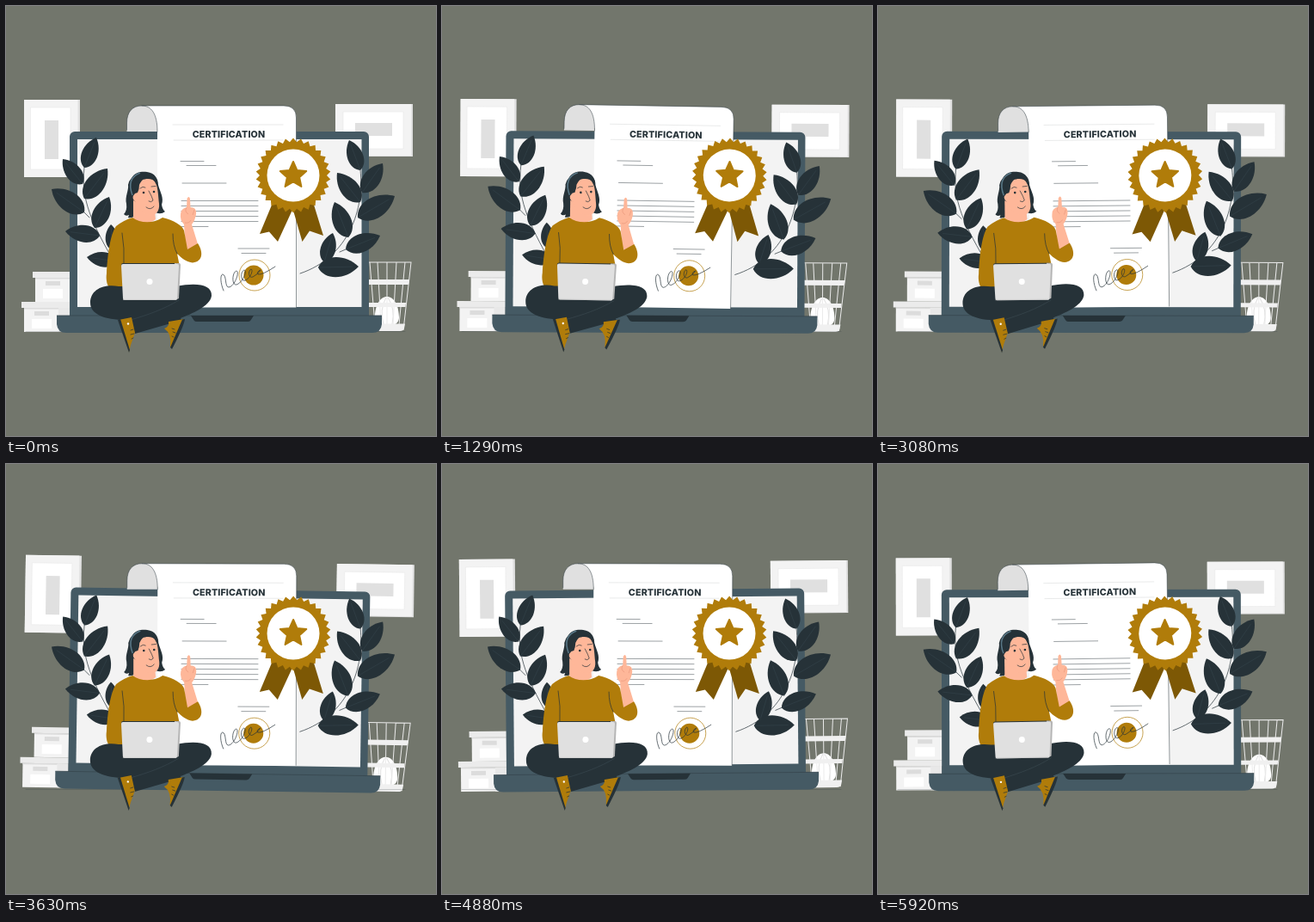
Recreate the animation shown at these times as an HTML page. Size 500 by 500 pixels, loop 5960 ms.

```html
<!DOCTYPE html>
<html lang="en">
<head>
<meta charset="utf-8">
<title>Certification</title>
<style>
  html, body { margin: 0; width: 100%; height: 100%; overflow: hidden; background: #72766c; }
  svg { display: block; width: 100vw; height: 100vh; }
  .ink { fill: none; stroke: #263238; stroke-width: .7; stroke-linecap: round; stroke-linejoin: round; }
  .dark { fill: #263238; }
  .steel { fill: #455a64; }
  .gold { fill: #b07c0a; }
  .skin { fill: #feb799; }
  text { font: 800 10.7px Inter, "Open Sans", sans-serif; letter-spacing: .15px; fill: #263238; }
</style>
</head>
<body>
<svg viewBox="0 0 500 500">
  <!-- wall frames, boxes, basket -->
  <g class="back">
    <path fill="#e0e0e0" d="M21 109H86V199H21z"/>
    <path fill="#f3f3f3" d="M21 109H83.500V199H21z"/>
    <path fill="#fff" stroke="#e8e8e8" stroke-width=".6" d="M28.500 118H75V190H28.500z"/>
    <path fill="#e0e0e0" d="M45 133H61V178H45z"/>

    <path fill="#e0e0e0" d="M383 114H473V175H383z"/>
    <path fill="#f3f3f3" d="M383 114H471V174H383z"/>
    <path fill="#fff" stroke="#e8e8e8" stroke-width=".6" d="M392 123H462V166H392z"/>
    <path fill="#e0e0e0" d="M406 136H449V151H406z"/>

    <g id="box">
      <path fill="#f3f3f3" d="M21 351H74V379H21z"/>
      <path fill="#e8e8e8" d="M61 351H74V379H61z"/>
      <path fill="#ebebeb" d="M18 344H76V351H18z"/>
      <path fill="#dcdcdc" d="M21 351H61V352.500H21zM33 355H50V360H33z"/>
      <path fill="#fff" d="M30 364H53V375H30z"/>
    </g>
    <use href="#box" x="13" y="-35"/>

    <path fill="#fff" d="M429 362C429 348 435 338 443 338S457 348 457 362Q457 372 443 372T429 362z"/>
    <path fill="none" stroke="#e0e0e0" d="M439 370Q434 353 442 339M449 370Q453 352 444 339"/>
    <path fill="none" stroke="#ebebeb" d="M421 298H471L462 377M464 298L457 371M454 298L450 371M443 298V371M432 298L436 371M423 298L429 371"/>
    <path fill="#f0f0f0" d="M421 318H469L468 324H421zM421 345H465L464.500 350H421zM421 369.500H464L463 375Q462 378 458 378H421z"/>
  </g>

  <path class="ink" opacity=".3" d="M23 378.500H464"/>

  <!-- large laptop -->
  <g class="back">
    <rect class="steel" x="74" y="146" width="348" height="222" rx="6"/>
    <path fill="#f3f3f3" d="M83 155H413.500V350H83z"/>
    <path class="steel" d="M59 360H437V370Q436 380 426 380H70Q60 380 59 370z"/>
    <path fill="none" stroke="#37474f" stroke-width=".8" d="M59 360H437"/>
    <path class="dark" d="M215 360H288L284.500 365.500Q283.500 367 281 367H222Q219.500 367 218.500 365.500z"/>
  </g>

  <g id="plants"></g>

  <!-- certificate -->
  <g id="paper">
    <path fill="#fff" d="M158 116H323Q337.500 116 337.500 130V350.500H176V143z"/>
    <path fill="#e0e0e0" d="M140.500 146V136C140.500 123 147 116 158 116S176 125 176 146z"/>
    <path class="ink" stroke-width=".5" opacity=".7" d="M140.500 144V136C140.500 123 147 116 158 116S176 125 176 146M158 116H323Q337.500 116 337.500 130V350"/>
    <path class="ink" opacity=".15" d="M194 138H322M195 156H322"/>
    <text x="259" y="153" text-anchor="middle">CERTIFICATION</text>
    <path class="ink" opacity=".65" d="M203 180.500H230M210 185.500H244M205 206H256M204 226.500H293M204 232.500H293M204 238.500H293M204 244.500H293M204 250.500H293M204 256.500H235M270 282H306M274 287.500H302"/>
    <circle cx="289" cy="313" r="18" fill="none" stroke="#b07c0a" stroke-width=".7"/>
    <circle class="gold" cx="288" cy="313" r="11.500"/>
    <path class="ink" stroke-width=".6" d="M253 331C249 322 249 312 252 312C257 313 254 327 259 327C266 326 272 309 268 308C263 309 262 325 268 324C275 322 281 308 277 307C272 309 273 321 278 319C284 317 288 307 285 306C281 308 282 317 287 315Q293 312 296 307Q291 309 293 312Q298 313 313 303"/>
  </g>

  <g id="medal">
    <path fill="#7d5805" d="M310 229L295 265L306 262.500L316 274L333.500 236L344.500 274L353 261.500L369 267L357 228z"/>
    <path id="rosette" class="gold"/>
    <circle cx="334" cy="197" r="30.500" fill="#fff"/>
    <path id="star" class="gold" stroke="#b07c0a" stroke-width="2" stroke-linejoin="round"/>
  </g>

  <!-- person -->
  <g id="person">
    <path class="dark" d="M146 200C150 193 158 192 164 193C173 194 177 201 177 208C179 216 184 223 181 231Q182 237 185 239Q180 243 174 240L150 244Q146 247 142 246L143 243Q139 245 137 242Q141 238 140 230C138 222 143 214 142 208Q143 203 146 200z"/>
    <path class="skin" d="M148 226V249Q161 258 174 248L173 238z"/>
    <path class="skin" d="M153 207C157 200 170 199 174 205C177 213 177 221 178 230C179 239 173 245 166 243C158 241 153 236 151 228Q146 225 148 218Q150 214 153 217z"/>
    <path class="dark" d="M147 222C145 205 151 197 163 198Q157 203 155 208Q155 213 153 217L150 218zM161 198Q171 198 175.500 209Q178 202 171 197z"/>
    <path fill="none" stroke="#587685" stroke-width="1.600" d="M147 220C142 207 145 198 156 194"/>
    <path class="ink" stroke-width="1.100" d="M156 212Q159 209 162 211M169 210L174 209.500"/>
    <path class="ink" d="M166 215Q170 222 171 226Q169 229 166 227M163 234Q168 238 172 233"/>
    <circle class="dark" cx="160" cy="217" r="1.300"/>
    <circle class="dark" cx="172" cy="216" r="1.300"/>

    <path class="skin" d="M210.500 224Q212.500 220 214 224L214.500 234Q222 234 221 242Q220 249 216 254L224 280Q219 289 209 284L207 254Q202 249 203 242Q203 236 210 234z"/>
    <path fill="none" stroke="#e28d72" stroke-width=".5" d="M210 234Q207 239 212 242M219 237L217 243M208 252Q213 253 215 249"/>
    <path class="gold" d="M147 246C156 253 172 253 182 246C195 249 205 255 207 261L211 283L223 276C229 285 230 297 217 298.500C210 298 204 293 199 288L202 303L137 333L123 330C117 327 116 317 117 311C118 290 121 266 128 256Q137 249 147 246z"/>
    <path class="ink" stroke-width=".5" d="M135 264Q138 282 137 299M194 265Q194 279 199 288"/>

    <path class="dark" d="M98 345C98 330 113 323 131 326L198 326C222 321 240 324 239 337C237 350 215 358 203 363L206 368L188 370L150 381L145 365C116 366 98 359 98 345z"/>
    <path fill="none" stroke="#3c4b53" stroke-width=".6" d="M145 365C165 359 183 353 201 342"/>

    <path class="gold" d="M131 365L146 362L150 380L145 394L143 402z"/>
    <path class="dark" d="M130 365L133 364L144 400L143 403z"/>
    <path class="gold" d="M184 375Q190 373 189 367L207 364L193 398L191 396Q193 381 184 375z"/>
    <path class="dark" d="M205 364.500L208 364Q207 372 193 399L191 397z"/>
    <circle cx="142" cy="369.500" r="1.200" fill="#fff"/>
    <path class="ink" stroke-width=".8" d="M145 377L148 376M145 382L149 381M146 387L148 386M193 375L196 376M194 379L197 380M193 384L195 385"/>

    <path class="dark" d="M134 301Q134 299 136 299H199L198 303H134z"/>
    <path fill="#b5b5b5" d="M196 299H201Q203 299 203 301L201 340L197 342z"/>
    <path fill="#e0e0e0" d="M134 302Q134 300 136 300H199Q201 300 201 302L199 340Q199 342 197 342H138Q136 342 136 340z"/>
    <path fill="none" stroke="#c4c4c4" stroke-width=".6" d="M136 341.500H198"/>
    <circle cx="167" cy="320.500" r="3.500" fill="#fff"/>
  </g>
</svg>
<script>
const $ = id => document.getElementById(id);

// Leaf from its base to its tip, with a midrib
function leaf(bx, by, tx, ty) {
  const dx = tx - bx, dy = ty - by;
  const at = (along, side) => `${bx + dx * along - dy * side} ${by + dy * along + dx * side}`;
  return `<path class="dark" d="M${bx} ${by}C${at(.15, .33)} ${at(.68, .33)} ${tx} ${ty}
    C${at(.68, -.33)} ${at(.15, -.33)} ${bx} ${by}"/>
    <path d="M${bx} ${by}L${at(.85, 0)}" stroke="#37474f" stroke-width=".5"/>`;
}

const leaves = [
  [91, 188, 105, 153], [89, 207, 66, 178], [91, 224, 118, 189], [91, 240, 53, 213],
  [103, 258, 120, 222], [109, 267, 69, 262], [124, 284, 122, 254], [129, 297, 94, 292],
  [412, 191, 399, 156], [414, 217, 438, 183], [412, 228, 385, 194], [409, 246, 452, 221],
  [398, 269, 382, 228], [395, 283, 435, 267], [370, 298, 380, 264], [363, 304, 410, 303]
];
$('plants').innerHTML =
  `<path class="ink" stroke-width=".5" d="M91 188C87 225 98 250 130 305M91 240L97 246M109 267L106 264
    M412 191C417 235 399 292 342 311M395 283L388 286"/>` +
  leaves.map(l => leaf(...l)).join('');

// Closed zigzag alternating between two radii
function spikes(cx, cy, count, outer, inner) {
  const points = Array.from({ length: count * 2 }, (_, i) => {
    const a = Math.PI * (i / count - .5), r = i % 2 ? inner : outer;
    return `${cx + r * Math.cos(a)} ${cy + r * Math.sin(a)}`;
  });
  return `M${points.join('L')}z`;
}
$('rosette').setAttribute('d', spikes(334, 197, 30, 43.5, 39));
$('star').setAttribute('d', spikes(334, 197, 5, 16, 7.5));

// Linear sway: 0, +1 at a quarter, -1 at three quarters, 0
function sway(t, delay) {
  if (t < delay) return 0;
  const p = (t - delay) / 3000 % 1;
  return p < .25 ? 4 * p : p < .75 ? 2 - 4 * p : 4 * p - 4;
}

const parts = [
  ...[...document.querySelectorAll('.back')].map(el => [el, 0, 247, 245]),
  [$('plants'), 500, 253, 234],
  [$('paper'), 500, 239.5, 234],
  [$('medal'), 500, 334, 214],
  [$('person'), 500, 168, 298]
];

const start = performance.now();
function draw() {
  const t = (performance.now() - start) % 5960;
  for (const [el, delay, x, y] of parts)
    el.setAttribute('transform', `rotate(${sway(t, delay)} ${x} ${y})`);
  requestAnimationFrame(draw);
}
draw();
</script>
</body>
</html>
```
